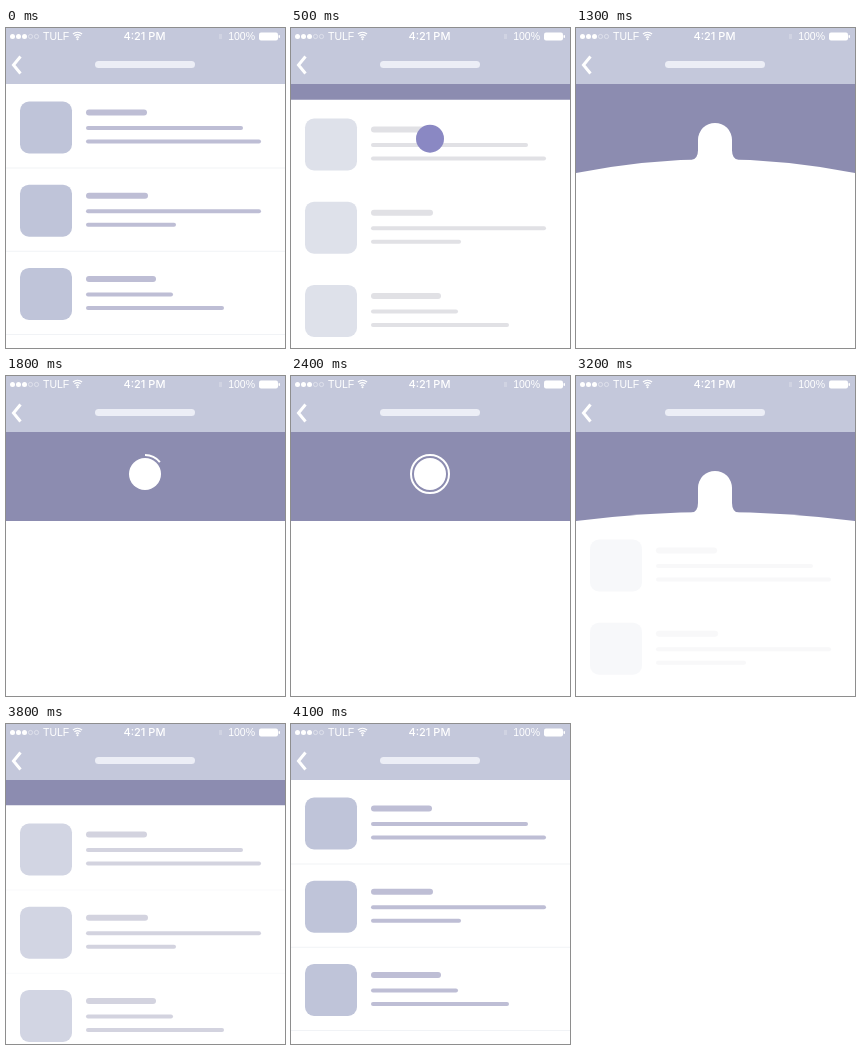
Write an HTML page with a canvas that moves like this. It is 279 by 320 pixels and loops after 5600 ms.

```html
<!DOCTYPE html>
<html lang="en">
<head>
<meta charset="utf-8">
<title>Pull to refresh</title>
<style>
  html, body { margin: 0; width: 100%; height: 100%; overflow: hidden; background: #fff; }
  canvas { display: block; width: 279px; height: 320px; }
</style>
</head>
<body>
<canvas id="stage"></canvas>
<script>
const W = 279, H = 320, LOOP = 5600, STEP = 100;
const CX = 139, BAR = 56, BALL = 98, MAX_PULL = 90;
const BAND = '#8c8cb0', HEADER = '#c4c8db', TOUCH = '#8a88c3';

// Title, first and second line lengths of each row.
const rows = [[61, 157, 175], [62, 175, 90], [70, 87, 138]];

const canvas = document.getElementById('stage');
const g = canvas.getContext('2d');
const scale = window.devicePixelRatio || 1;
canvas.width = W * scale;
canvas.height = H * scale;
g.scale(scale, scale);

const span = (t, from, to) => Math.min(1, Math.max(0, (t - from) / (to - from)));
const smooth = u => u * u * (3 - 2 * u);
const smoother = u => u * u * u * (10 - 15 * u + 6 * u * u);
const backOut = u => 1 + 2.7 * (u - 1) ** 3 + 1.7 * (u - 1) ** 2;

// The whole pose as a function of time.
function pose(t) {
  const drag = 115 * smoother(span(t, 300, 1000));
  const pull = Math.min(drag, MAX_PULL) * (1 - smooth(span(t, 3260, 4100)));

  // The edge sags with the finger, springs back, then dips when the ball lands.
  const release = span(t, 1000, 1800), land = span(t, 3100, 3500);
  const sag = 0.4 * Math.max(0, drag - 16.5);
  const bend = sag * (1 - release) ** 1.5 * Math.cos(2 * Math.PI * release)
    - 14 * (1 - land) ** 1.5 * Math.sin(2 * Math.PI * land);

  const lift = t < 2400 ? span(t, 1150, 1750) : 1 - span(t, 2900, 3300);
  return {
    bend, pull, lift,
    edge: BAR - 1 + pull,
    ballY: BALL + 76 * (1 - backOut(lift)),
    neck: 1 - span(lift, 0.25, 0.5),
    ring: span(t, 1700, 2400),
    ringAlpha: 1 - span(t, 2900, 3100),
    touchY: 94 + drag,
    touch: span(t, 0, 400) * (1 - span(t, 1000, 1100)),
    tint: 1 - span(t, 0, 500) + span(t, 3600, 4100),
    rows: 1 - span(t, 500, 900) + span(t, 3100, 3500)
  };
}

function mix(a, b, k) {
  return `rgb(${a.map((v, i) => Math.round(v + (b[i] - v) * k))})`;
}

function pill(x, y, w, h, r, color) {
  g.fillStyle = color;
  g.beginPath();
  g.roundRect(x, y, w, h, r);
  g.fill();
}

function disc(x, y, r, color) {
  g.fillStyle = color;
  g.beginPath();
  g.arc(x, y, r, 0, Math.PI * 2);
  g.fill();
}

function arc(x, y, r, from, to, width) {
  g.strokeStyle = '#fff';
  g.lineWidth = width;
  g.beginPath();
  g.arc(x, y, r, from, to);
  g.stroke();
}

function label(text, x, font, align) {
  g.font = font + ', "Liberation Sans", sans-serif';
  g.textAlign = align;
  g.fillStyle = '#fff';
  g.fillText(text, x, 12);
}

function drawSheet({ edge, bend }) {
  g.fillStyle = '#fff';
  g.beginPath();
  g.moveTo(0, edge);
  g.quadraticCurveTo(CX, edge + bend * 2, W, edge);
  g.lineTo(W, H);
  g.lineTo(0, H);
  g.fill();
}

function drawRows({ pull, tint }) {
  const box = mix([222, 225, 234], [191, 196, 217], tint);
  const line = mix([225, 225, 229], [190, 190, 213], tint);
  const rule = mix([255, 255, 255], [241, 243, 246], tint);
  rows.forEach(([title, first, second], i) => {
    const y = BAR + Math.round(pull) + i * 83.2;
    pill(14, y + 17.5, 52, 52, 9, box);
    pill(80, y + 25.5, title, 6, 3, line);
    pill(80, y + 42, first, 4, 2, line);
    pill(80, y + 55.5, second, 4, 2, line);
    pill(0, y + 83.5, W, 1, 0, rule);
  });
}

function drawNeck(y, r, waist, surface) {
  g.beginPath();
  for (const side of [-1, 1]) {
    const x = d => CX + side * d;
    g.moveTo(CX, y);
    g.lineTo(x(r), y);
    g.quadraticCurveTo(x(waist), y, x(waist), surface - 9);
    g.quadraticCurveTo(x(waist), surface, x(waist + 7), surface + 1);
    g.lineTo(CX, surface + 1);
  }
  g.fill();
}

function drawBall({ ballY, neck, edge, bend, ring, ringAlpha }) {
  const r = 16 + neck, surface = edge + bend;
  disc(CX, ballY, r, '#fff');
  if (neck > 0 && ballY < surface - 9) drawNeck(ballY, r, r * neck, surface);
  if (ring > 0) {
    const start = -Math.PI / 2;
    g.globalAlpha = ringAlpha;
    arc(CX, ballY, 19, start, start + ring * Math.PI * 2, 2);
    g.globalAlpha = 1;
  }
}

function drawHeader() {
  g.fillStyle = HEADER;
  g.fillRect(0, 0, W, BAR);
  for (let i = 0; i < 5; i++) {
    const x = 6.5 + i * 6;
    if (i < 3) disc(x, 8.5, 2.5, '#fff');
    else arc(x, 8.5, 2.1, 0, Math.PI * 2, 0.4);
  }
  label('TULF', 37, '10.5px "Liberation Sans"', 'left');
  label('4:21 PM', 138.5, '500 11px Inter', 'center');
  label('100%', 249, '10.5px "Liberation Sans"', 'right');

  const up = -Math.PI / 2;
  for (let r = 2.5; r < 8; r += 2.3) arc(71.5, 11.5, r, up - 0.7, up + 0.7, 1.2);
  disc(71.5, 11.2, 1, '#fff');

  pill(213, 6, 3, 5, 0, '#d0d3e2');
  pill(253, 4.5, 19, 8, 2, '#fff');
  pill(272.5, 7, 1.5, 3, 0.7, '#fff');

  g.strokeStyle = '#fff';
  g.lineWidth = 3;
  g.beginPath();
  g.moveTo(14.5, 28.5);
  g.lineTo(7.5, 37);
  g.lineTo(14.5, 45.5);
  g.stroke();
  pill(89, 33, 100, 7, 3.5, '#eceef6');
}

function draw(t) {
  const p = pose(t);
  g.fillStyle = BAND;
  g.fillRect(0, 0, W, H);
  drawSheet(p);

  g.globalAlpha = p.rows;
  drawRows(p);
  g.globalAlpha = 1;

  if (p.lift > 0) drawBall(p);

  g.globalAlpha = p.touch;
  disc(CX, p.touchY, 14, TOUCH);
  g.globalAlpha = 1;

  drawHeader();
}

const begin = performance.now();
function tick() {
  const t = (performance.now() - begin) % LOOP;
  draw(Math.floor(t / STEP) * STEP);
  requestAnimationFrame(tick);
}
tick();
</script>
</body>
</html>
```
